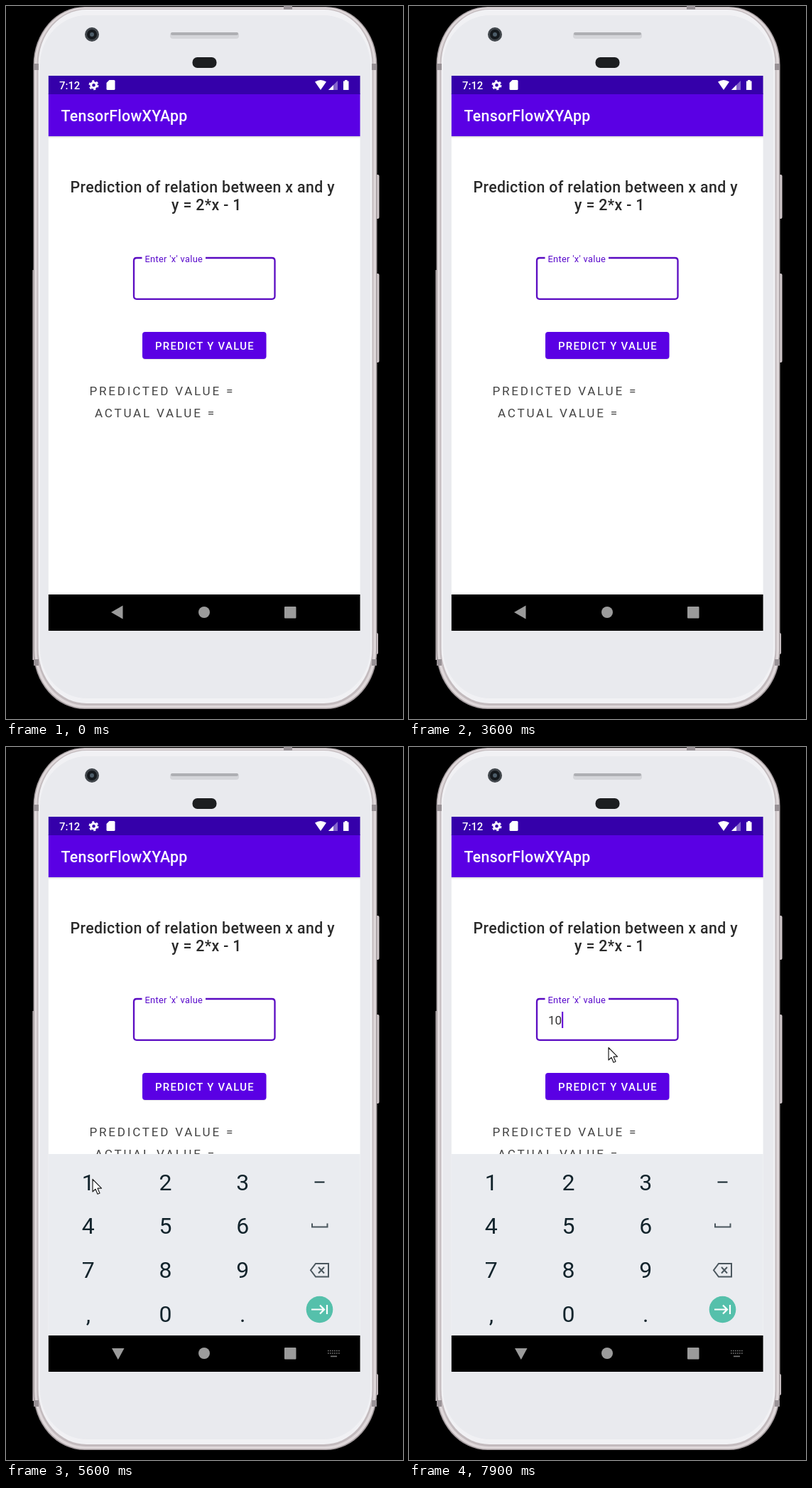
An HTML page that plays this animation: 559x1002 px, repeating every 8000 ms.

```html
<!DOCTYPE html>
<html lang="en">
<head>
<meta charset="utf-8">
<title>Phone app demo</title>
<style>
  html, body { margin: 0; width: 100%; height: 100%; overflow: hidden; background: #000; }
  svg { display: block; width: 100%; height: 100%; }
  text { font-family: Roboto, sans-serif; white-space: pre; }
  .medium { font-weight: 500; }
  .result { font-size: 17.07px; letter-spacing: 2.77px; fill: #444; }
  .digit { font-size: 32px; text-anchor: middle; fill: #13242c; }
</style>
</head>
<body>
<svg viewBox="0 0 559 1002" preserveAspectRatio="none">
  <defs>
    <linearGradient id="shade" x2="0" y2="1">
      <stop stop-color="#000" stop-opacity=".16"/>
      <stop offset="1" stop-color="#000" stop-opacity="0"/>
    </linearGradient>
    <clipPath id="screen"><rect x="59.800" y="98" width="438.800" height="729"/></clipPath>
  </defs>

  <!-- phone body -->
  <g fill="#cfc6c9">
    <rect x="519" y="237" width="6.500" height="62" rx="2"/>
    <rect x="519" y="376" width="6.500" height="125" rx="2"/>
    <rect x="519" y="881" width="5" height="30" rx="2"/>
    <rect x="37.500" y="371" width="3" height="548"/>
  </g>
  <rect x="38.500" y="1" width="484" height="987" rx="72" ry="82" fill="#a39b9e"/>
  <rect x="40" y="2" width="481" height="984.500" rx="71" ry="81" fill="#dfd8da"/>
  <rect x="43.500" y="4" width="474" height="979" rx="69" ry="78" fill="#c3bbbe"/>
  <rect x="45.500" y="5" width="470" height="975" rx="68" ry="77" fill="#f1f1f4"/>
  <rect x="48" y="13" width="465" height="960" rx="66" ry="70" fill="#e9eaee"/>
  <path d="M391 0h12v5h-12zM39 81h7v9h-7zM515 81h7v9h-7zM39 918h7v9h-7zM515 918h7v9h-7z" fill="#989195"/>
  <circle cx="121" cy="40" r="10" fill="#41464b"/>
  <circle cx="121" cy="40" r="7" fill="#15191d"/>
  <circle cx="121" cy="40" r="3" fill="#4c5c68"/>
  <rect x="231" y="37" width="97" height="9" rx="4" fill="#d5d6da"/>
  <rect x="232" y="37" width="95" height="4" rx="2" fill="#aeafb3"/>
  <rect x="262.500" y="72" width="34" height="15" rx="7" fill="#1c1e20"/>

  <!-- app -->
  <rect x="59.800" y="98" width="438.800" height="780" fill="#fff"/>
  <rect x="59.800" y="183" width="438.800" height="3" fill="url(#shade)"/>
  <rect x="59.800" y="123" width="438.800" height="60" fill="#5a00e4"/>
  <rect x="59.800" y="98" width="438.800" height="26" fill="#3500aa"/>
  <g fill="#fff">
    <text class="medium" x="75" y="117" font-size="14.9">7:12</text>
    <circle cx="123.500" cy="111.300" r="3.800" fill="none" stroke="#fff" stroke-width="3"/>
    <circle cx="123.500" cy="111.300" r="6" fill="none" stroke="#fff" stroke-width="2" stroke-dasharray="3.14"/>
    <path d="M145.500 104h6.500q1.500 0 1.500 1.500v11q0 1.500-1.500 1.500h-9q-1.500 0-1.500-1.500V108z"/>
    <path d="M435 106.500Q443 101.500 451 106.500L443 118z"/>
    <path d="M467 105v13h-13z" opacity=".4"/><path d="M461 111v7h-7z"/>
    <path d="M477 104h3.500v1.500h2V118h-7.500v-12.500h2z"/>
    <text class="medium" x="77.500" y="162" font-size="21.3" letter-spacing=".3">TensorFlowXYApp</text>
  </g>
  <g class="medium" font-size="21.3" letter-spacing=".36" fill="#2a2a2a">
    <text x="90.500" y="261.500">Prediction of relation between x and y</text>
    <text x="233" y="286.500">y = 2*x - 1</text>
  </g>
  <path d="M191.500 354H184q-4 0-4 4v49.800q0 4 4 4h190.500q4 0 4-4V358q0-4-4-4H281" fill="none" stroke="#5a0bc2" stroke-width="2.300"/>
  <text x="195.500" y="359.500" font-size="12.8" letter-spacing=".32" fill="#5a0bcc">Enter 'x' value</text>
  <text id="entry" x="196" y="390" font-size="17.07" fill="#333"></text>
  <rect id="caret" y="372" width="2.200" height="23" fill="#6a10d8"/>
  <rect x="192" y="458.500" width="174.500" height="38.500" rx="4" fill="#000" opacity=".1"/>
  <rect x="192" y="458" width="174.500" height="38" rx="4" fill="#5a00e4"/>
  <text class="medium" x="210" y="482.500" font-size="14.9" letter-spacing="1.28" fill="#fff">PREDICT Y VALUE</text>
  <text class="result" x="117.500" y="546.500">PREDICTED VALUE =</text>
  <text class="result" x="125" y="578">ACTUAL VALUE =</text>

  <!-- keyboard -->
  <g clip-path="url(#screen)">
    <g id="keyboard">
      <rect x="59" y="572" width="440" height="255" fill="#eaecf0"/>
      <rect id="press" width="109" height="61" rx="3" fill="#d3d6da"/>
      <g id="keys"></g>
      <g fill="none" stroke="#4b575e" stroke-width="2">
        <path d="M434.500 611.500h14" stroke="#13242c"/>
        <path d="M431 669.500v5h21.500v-5M436 726h18v18.500h-18l-7-9.250zM440 731l8 8.500m0-8.500l-8 8.500"/>
      </g>
      <circle cx="441.500" cy="790.500" r="18.800" fill="#55c0ab"/>
      <path d="M430 790.500h18m-6-6l6 6-6 6M452 784v13" fill="none" stroke="#fff" stroke-width="2.200"/>
    </g>
  </g>

  <!-- navigation bar -->
  <rect x="59.800" y="827" width="438.800" height="51" fill="#000"/>
  <g fill="#9b9b9b">
    <path id="back"/>
    <circle cx="279" cy="852" r="8"/>
    <rect x="392" y="844" width="16.500" height="16.500" rx="1"/>
    <g id="switcher" opacity=".75">
      <path d="M453 848.500h17M453 852h17" stroke="#9b9b9b" stroke-width="1.700" stroke-dasharray="1.7 1.3"/>
      <path d="M457 855.500h9v1.700h-9z"/>
    </g>
  </g>

  <path id="pointer" d="M0 .5V18l4-3.700 3 7 3-1.300-3-6.800h5.500z" fill="#fff" stroke="#222" stroke-width="1.200" stroke-linejoin="round"/>
</svg>
<script>
const LOOP = 8000, STEP = 100;
const $ = id => document.getElementById(id);
const show = (id, on) => $(id).style.display = on ? '' : 'none';
const keyCenter = i => [115.8 + i % 3 * 108.7, 611 + Math.floor(i / 3) * 61.8];

$('keys').innerHTML = [...'123456789,0.'].map((char, i) => {
  const [x, y] = keyCenter(i);
  return `<text class="digit" x="${x}" y="${y + 11.5}">${char}</text>`;
}).join('');

// time, x, y of the pointer tip
const path = [
  [100, 487, 40], [300, 330, 300], [500, 75, 471], [800, 276, 354],
  [900, 276, 354], [1800, 249, 380], [1900, 258, 380], [2000, 258, 380],
  [2200, 247, 384], [2700, 247, 384], [3800, 49, 484], [4400, 244, 392],
  [4500, 244, 392], [4600, 258, 389], [4700, 258, 389], [5500, 122, 607],
  [5900, 122, 607], [6600, 229, 793], [7000, 229, 793], [7600, 304, 304],
  [7900, 281, 422]
];

function pointerAt(t) {
  const next = path.findIndex(p => p[0] > t);
  if (next < 1) return path[next ? path.length - 1 : 0].slice(1);
  const [t0, x0, y0] = path[next - 1], [t1, x1, y1] = path[next];
  const p = (t - t0) / (t1 - t0), ease = p * p * (3 - 2 * p);
  return [x0 + (x1 - x0) * ease, y0 + (y1 - y0) * ease];
}

function render(t) {
  const value = t < 5800 ? '' : t < 6800 ? '1' : '10';
  $('entry').textContent = value;

  // the blink restarts with each typed digit
  const blinkStart = [100, 5800, 6800][value.length];
  show('caret', (t - blinkStart + LOOP) % 1000 < 500);
  $('caret').setAttribute('x', 195.8 + value.length * 9.6);

  const rise = Math.min(1, Math.max(0, (t - 4550) / 150));
  const open = t >= 4600;
  show('keyboard', open);
  show('switcher', open);
  $('keyboard').setAttribute('transform', `translate(0 ${255 * (1 - rise) ** 3})`);
  $('back').setAttribute('d', open ? 'M149 845h17.500l-8.700 16z' : 'M148 852l16.500-9.500v19z');

  const pressed = t >= 5700 && t < 5800 ? 0 : t >= 6700 && t < 6800 ? 10 : -1;
  show('press', pressed >= 0);
  const [kx, ky] = keyCenter(Math.max(0, pressed));
  $('press').setAttribute('transform', `translate(${kx - 54.5} ${ky - 30.5})`);

  show('pointer', t >= 100 && t < 2700 || t >= 3800);
  $('pointer').setAttribute('transform', `translate(${pointerAt(t)})`);
}

const start = performance.now();
function tick() {
  const t = (performance.now() - start) % LOOP;
  render(Math.floor(t / STEP) * STEP);
  requestAnimationFrame(tick);
}
tick();
</script>
</body>
</html>
```
